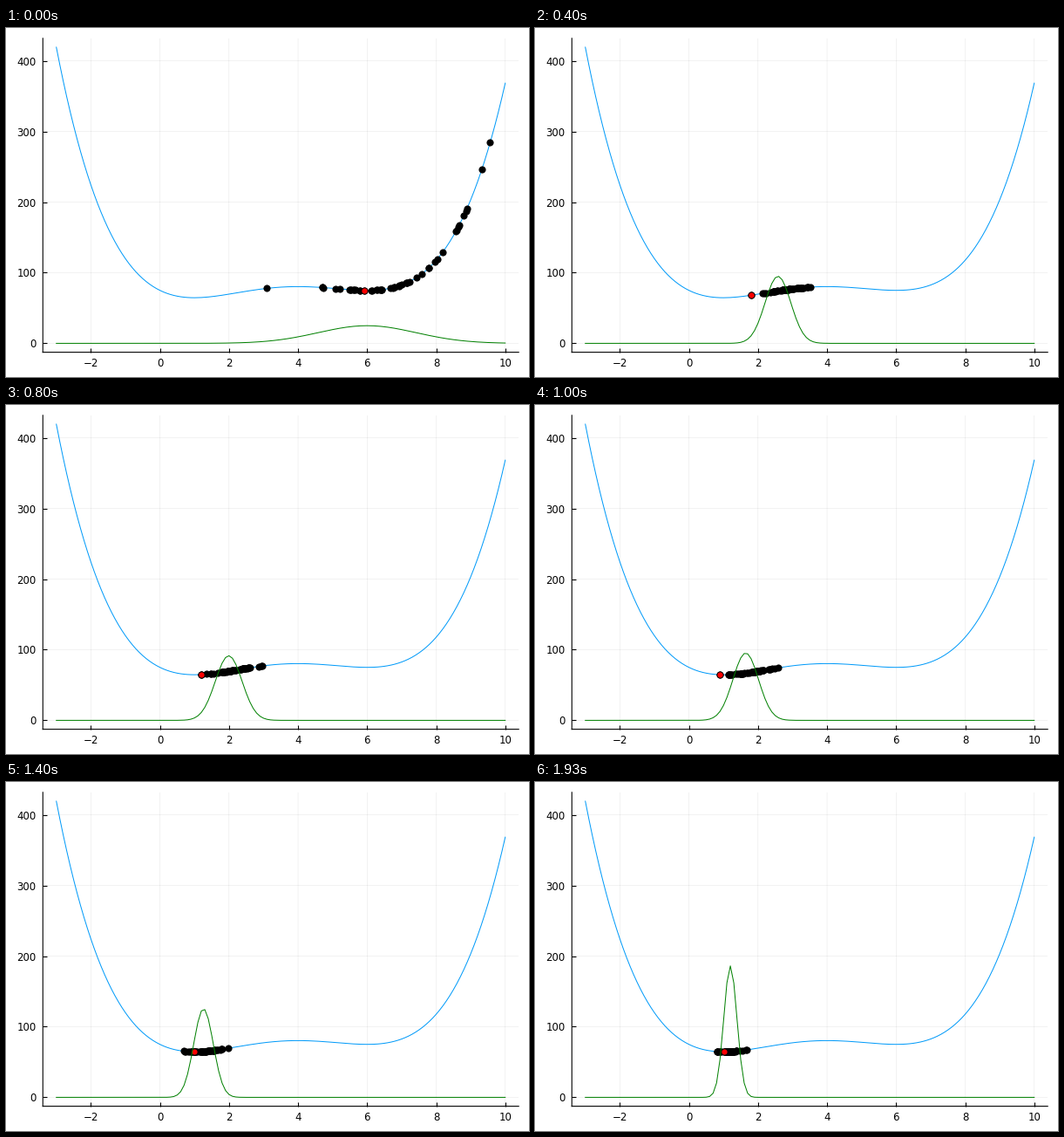
A matplotlib script for the animation above (1990 ms loop, 600 by 400 pixels).

```python
import matplotlib.pyplot as plt
import numpy as np
from matplotlib.animation import FuncAnimation

W, H, DPI = 600, 400, 100
PX = 72 / DPI          # points per pixel
STEPS, TICK_MS, TICKS = 30, 10, 199
POPULATION = 50

plt.rcParams["font.family"] = "DejaVu Sans"
plt.rcParams["path.snap"] = False


def loss(x):
    return x**4 / 4 - 11 * x**3 / 3 + 17 * x**2 - 24 * x + 75


def bell(x, mu, sd):
    return 50 / (sd * np.sqrt(2)) * np.exp(-((x - mu) / sd) ** 2 / 2)


# The search jumps off the plateau, then creeps into the left valley
KEYS = [0, 1, 3, 10, 15, 21, 25, 29]
MEANS = [6, 2.97, 2.845, 2.223, 1.645, 1.262, 1.228, 1.2]
SPREADS = [1.414, 0.342, 0.354, 0.397, 0.371, 0.282, 0.246, 0.19]


def dist(step):
    return np.interp(step, KEYS, MEANS), np.interp(step, KEYS, SPREADS)


def cloud(step):
    """Normal sample stretched to a fixed reach around the mean."""
    mu, sd = dist(step)
    z = np.random.default_rng(step).normal(size=POPULATION)
    return mu + sd * np.interp(z, [z.min(), z.max()], [-2.05, 2.52])


fig = plt.figure(figsize=(W / DPI, H / DPI), dpi=DPI, facecolor="white")
left, right, top, bottom = 42.28, 588.19, 11.81, 371.61
ax = fig.add_axes([left / W, 1 - bottom / H,
                   (right - left) / W, (bottom - top) / H])
grid = np.linspace(-3, 10, 131)
high = loss(-3)
ax.set_xlim(-3 - 0.03 * 13, 10 + 0.03 * 13)
ax.set_ylim(-0.03 * high, 1.03 * high)
ax.set_xticks(range(-2, 11, 2))
ax.set_yticks(range(0, 401, 100))
ax.spines[["top", "right"]].set_visible(False)
ax.spines[["left", "bottom"]].set_linewidth(1.1 * PX)
ax.set_axisbelow(True)
ax.grid(color="black", alpha=0.1, linewidth=0.5 * PX)
ax.tick_params(direction="in", length=5 * PX, width=1.1 * PX,
               labelsize=11.7 * PX)
ax.tick_params(axis="x", pad=6.2 * PX)
ax.tick_params(axis="y", pad=7.7 * PX)

dot = dict(ls="", marker="o", ms=7.2 * PX, mec="black", mew=0.9 * PX)
ax.plot(grid, loss(grid), color="#009AF9", lw=PX, zorder=2)
points, = ax.plot([], [], mfc="black", zorder=3, **dot)
best, = ax.plot([], [], mfc="red", zorder=4, **dot)
curve, = ax.plot([], [], color="green", lw=PX, zorder=5)

# Steps start on the nearest 10 ms of a 15 per second clock
starts = np.round(np.arange(STEPS) * 20 / 3)


def draw(tick):
    step = int(np.searchsorted(starts, tick, side="right")) - 1
    xs = cloud(step)
    ys = loss(xs)
    pick = np.argmin(ys)
    curve.set_data(grid, bell(grid, *dist(step)))
    points.set_data(xs, ys)
    best.set_data([xs[pick]], [ys[pick]])
    return points, best, curve


anim = FuncAnimation(fig, draw, frames=TICKS, interval=TICK_MS,
                     repeat=True, repeat_delay=0)
plt.show()
```
